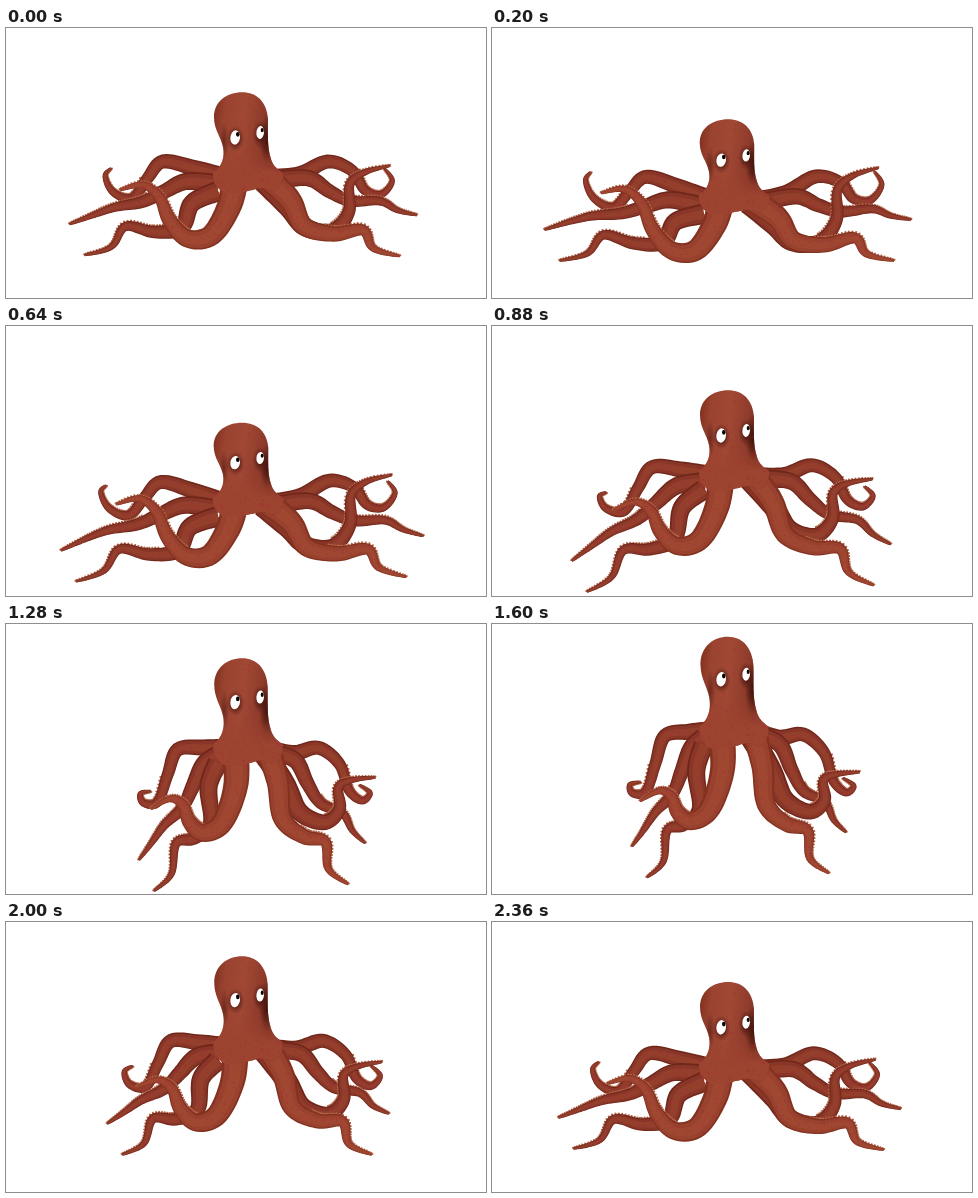
Recreate the animation shown at these times as an HTML page. Size 480 by 270 pixels, loop 2400 ms.

```html
<!DOCTYPE html>
<html lang="en">
<head>
<meta charset="utf-8">
<title>Octopus</title>
<style>
html, body { margin: 0; width: 100%; height: 100%; overflow: hidden; background: #fff; }
svg { display: block; width: 100%; height: 100%; }
</style>
</head>
<body>
<svg viewBox="0 0 480 270">
  <defs>
    <linearGradient id="skin" gradientUnits="userSpaceOnUse" x1="207" y1="90" x2="268" y2="98">
      <stop offset="0" stop-color="#81321f"/>
      <stop offset=".18" stop-color="#9a4330"/>
      <stop offset=".5" stop-color="#a04834"/>
      <stop offset=".8" stop-color="#8f3b2b"/>
      <stop offset="1" stop-color="#712a1d"/>
    </linearGradient>
    <linearGradient id="chest" gradientUnits="userSpaceOnUse" x1="0" y1="116" x2="0" y2="144">
      <stop offset="0" stop-color="#9c4430" stop-opacity="0"/>
      <stop offset="1" stop-color="#9c4430"/>
    </linearGradient>
    <radialGradient id="dark">
      <stop offset="0" stop-color="#3a100b" stop-opacity=".95"/>
      <stop offset=".5" stop-color="#4a170f" stop-opacity=".6"/>
      <stop offset="1" stop-color="#5a2016" stop-opacity="0"/>
    </radialGradient>
    <clipPath id="inside"><use href="#shape"/></clipPath>
  </defs>
  <g id="arms"></g>
  <g id="head">
    <path id="shape" fill="url(#skin)" d="M207 144C216 138 219 128 217 118C215 108 208 101 208 88C208 72 221 63 236 63C251 63 261 73 262 90C262 105 261 118 265 130C267 137 271 140 277 144C278 152 274 162 266 162C260 159 254 158 247 161C239 162 230 167 217 163C210 159 207 151 207 144Z"/>
    <g clip-path="url(#inside)">
      <rect x="200" y="114" width="84" height="54" fill="url(#chest)"/>
      <ellipse cx="261" cy="110" rx="8" ry="24" fill="url(#dark)"/>
      <ellipse cx="218" cy="112" rx="5" ry="20" fill="url(#dark)" opacity=".5"/>
      <path id="freckles" fill="none" stroke="#a8243f" stroke-width="1.2" stroke-linecap="round" opacity=".55"/>
    </g>
  </g>
  <g id="eyes">
    <ellipse cx="229.5" cy="1" rx="9" ry="13" fill="url(#dark)"/>
    <ellipse cx="254.5" cy="-3" rx="8" ry="14" fill="url(#dark)"/>
    <g fill="#fff">
      <ellipse cx="229.2" cy="0" rx="4.8" ry="7.2" transform="rotate(8 229 0)"/>
      <ellipse cx="254.2" cy="-5" rx="3.8" ry="6.5" transform="rotate(5 254 -5)"/>
    </g>
    <g fill="#0d0403">
      <ellipse cx="231.8" cy="-3.2" rx="1.8" ry="2.4"/>
      <ellipse cx="256.2" cy="-7.4" rx="1.5" ry="2.2"/>
    </g>
  </g>
</svg>
<script>
const LOOP = 2400, STEP = 40, SAMPLES = 60;
const MIDDLE = 238, REST = 140;

// Resting arms from back to front: root width, sideways reach, points from root to tip.
const ARMS = [
  [18, 27, 220,148, 191,141, 163,137, 150,156, 137,178, 120,174, 114,160, 122,154],
  [20, 47, 212,155, 188,156, 170,170, 153,184, 130,193, 111,205, 93,217],
  [21, 47, 212,162, 193,178, 188,206, 165,214, 141,212, 131,236, 108,248],
  [18, 17, 262,149, 291,147, 318,136, 341,147, 352,168, 367,174, 377,162, 368,151],
  [19, 35, 264,152, 296,152, 314,168, 332,181, 358,184, 372,196, 389,204],
  [24, 10, 257,151, 281,179, 297,201, 323,206, 339,188, 339,162, 354,151, 378,146],
  [26, 35, 262,149, 279,174, 289,203, 315,214, 341,213, 348,234, 372,245],
  [28, 21, 229,149, 226,179, 210,210, 188,215, 172,199, 163,177, 148,167, 127,174]
].map(([width, reach, ...points], i) =>
  ({ width, reach, points, back: i < 6, side: points[points.length - 2] < MIDDLE ? 1 : -1 }));

const $ = id => document.getElementById(id);
const fix = n => n.toFixed(1);
const angle = t => 2 * Math.PI * t / LOOP;

let seed = 7;
const random = () => (seed = seed * 16807 % 2147483647) / 2147483647;

// Three waves drive everything: the body bobs, the arms spread, the tips trail behind.
function motion(t) {
  const bob = angle(t - 440), out = angle(t - 330);
  return {
    drop: 36.4 * Math.cos(bob) + 4.9 * Math.cos(2 * bob) + 5 * Math.cos(3 * bob) - 5.8,
    spread: Math.cos(out) + 0.12 * Math.cos(2 * out - 2.44) + 0.04,
    trail: Math.cos(angle(t - 1100))
  };
}

function poseArm({ points, reach, side }, { drop, spread, trail }) {
  const last = points.length / 2 - 1;
  return points.map((v, j) => {
    const u = (j >> 1) / last;
    return j % 2
      ? v + drop * (1 - u) ** 1.4 + trail * u * (5 + 0.35 * reach)
      : v - side * reach * spread * u ** 0.8;
  });
}

// Samples of the centre line with unit normals and width.
function trace(p, width) {
  const n = p.length / 2, line = [];
  for (let i = 0; i <= SAMPLES; i++) {
    const f = i / SAMPLES * (n - 1), k = Math.min(n - 2, Math.floor(f)), u = f - k;
    const at = axis => {
      const [a, b, c, d] = [-1, 0, 1, 2].map(o => p[2 * Math.max(0, Math.min(n - 1, k + o)) + axis]);
      const q = 2 * a - 5 * b + 4 * c - d, r = 3 * b - a - 3 * c + d;
      return [b + u * (c - a + u * (q + u * r)) / 2, (c - a + u * (2 * q + 3 * u * r)) / 2];
    };
    const [x, dx] = at(0), [y, dy] = at(1), len = Math.hypot(dx, dy) || 1;
    line.push({ x, y, nx: dy / len, ny: -dx / len, w: 2 + (width - 2) * (1 - i / SAMPLES) ** 0.85 });
  }
  return line;
}

const spot = (s, v) => fix(s.x + s.nx * s.w * v) + " " + fix(s.y + s.ny * s.w * v);
const ribbon = (line, a, b) =>
  "M" + line.map(s => spot(s, a)).concat(line.map(s => spot(s, b)).reverse()).join("L") + "Z";

function addPath(attrs) {
  const el = document.createElementNS("http://www.w3.org/2000/svg", "path");
  for (const name in attrs) el.setAttribute(name, attrs[name]);
  return $("arms").appendChild(el);
}

const dots = (color, size, opacity) =>
  ({ fill: "none", stroke: color, "stroke-width": size, "stroke-linecap": "round", opacity });

for (const arm of ARMS) {
  arm.suckers = addPath(dots("#b3664a", 2.2, 1));
  arm.rim = addPath({ fill: arm.back ? "#702719" : "#83321f" });
  arm.mid = addPath({ fill: arm.back ? "#883627" : "#98412e" });
  arm.glow = addPath({ fill: "#a64c35", opacity: arm.back ? 0.4 : 0.6 });
  arm.flecks = addPath(dots("#a8243f", 1.4, 0.5));
  arm.spots = Array.from({ length: 60 }, () => [Math.floor(random() ** 1.3 * SAMPLES * 0.9), random() * 0.8 - 0.4]);
}

$("freckles").setAttribute("d", Array.from({ length: 140 }, () =>
  `M${fix(206 + random() * 74)} ${fix(64 + 100 * random() ** 0.7)}h.4`).join(""));

function draw(t) {
  const now = motion(t);
  for (const arm of ARMS) {
    const line = trace(poseArm(arm, now), arm.width), s = arm.side;
    arm.rim.setAttribute("d", ribbon(line, -0.5, 0.5));
    arm.mid.setAttribute("d", ribbon(line, -0.4 * s, 0.42 * s));
    arm.glow.setAttribute("d", ribbon(line, -0.2 * s, 0.25 * s));
    arm.flecks.setAttribute("d", arm.spots.map(([i, v]) => `M${spot(line[i], v)}h.3`).join(""));
    // Suckers line the underside of the outer half.
    arm.suckers.setAttribute("d", line.slice(SAMPLES * 0.45).map(q => `M${spot(q, -0.53 * s)}h.01`).join(""));
  }
  // The head stretches as the body rises.
  const shoulder = REST + now.drop, tall = 1 - now.drop * 0.0026, wide = 1 + (1 - tall) * 0.15;
  const eye = shoulder - 31.5 + 0.27 * Math.min(0, now.drop);
  $("head").setAttribute("transform", `matrix(${wide} 0 0 ${tall} ${236 * (1 - wide)} ${shoulder - REST * tall})`);
  $("eyes").setAttribute("transform", `translate(0 ${eye}) scale(1 ${Math.min(1, tall)})`);
}

const start = performance.now();
function tick() {
  const t = (performance.now() - start) % LOOP;
  draw(Math.floor(t / STEP) * STEP);
  requestAnimationFrame(tick);
}
tick();
</script>
</body>
</html>
```
